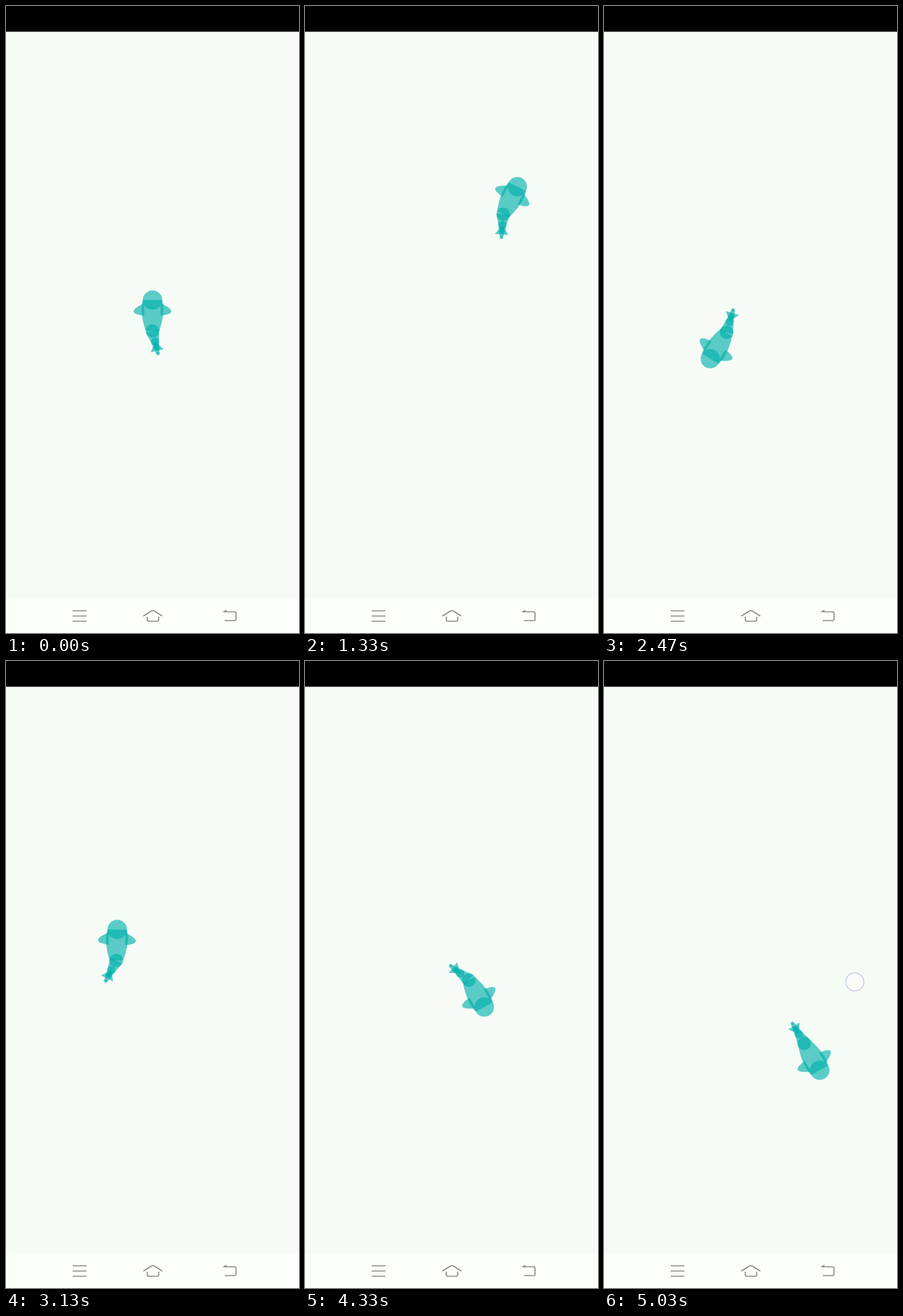
An HTML page with a canvas that plays this animation: 448x960 px, repeating every 5.06 s.

```html
<!DOCTYPE html>
<html lang="en">
<head>
<meta charset="utf-8">
<title>Swimming fish</title>
<style>
  html, body { margin: 0; width: 100%; height: 100%; overflow: hidden; background: #f6fbf6; }
  canvas { display: block; width: 448px; height: 960px; }
</style>
</head>
<body>
<canvas id="stage" width="448" height="960"></canvas>
<script>
const ctx = document.getElementById('stage').getContext('2d');
const LOOP = 5060, STEP = 100 / 3;

// Fish proportions, all derived from the head radius
const HEAD = 14.8;
const BODY = 3.2 * HEAD;
const BIG = 0.7 * HEAD;
const MID = 0.6 * BIG;
const TIP = 0.4 * MID;
const FIN = 1.3 * HEAD;
const TEAL = 'rgba(0,176,172,0.63)';

// Tap targets: the fish starts towards each one at `go` (seconds)
const START = { x: 224, y: 474 };
const TAPS = [
  { x: 321.5, y: 282.5, go: 0.615 },
  { x: 166.5, y: 533.5, go: 1.70 },
  { x: 171.8, y: 351.3, go: 2.81 },
  { x: 318, y: 606, go: 3.95 },
  { x: 383.5, y: 491.3, go: 5.08 }
];
const LEG = 1, TAP_LEAD = 0.18;

// Tail phase in degrees over time in seconds
const PHASE = [[0, 30], [0.5, 210], [0.73, 370], [1.33, 775], [2.47, 1588],
               [3.13, 2048], [4.33, 2932], [5.03, 3416], [5.07, 3444]];

const rad = d => d * Math.PI / 180;

function polar(p, len, deg) {
  return { x: p.x + len * Math.cos(rad(deg)), y: p.y - len * Math.sin(rad(deg)) };
}

function lerpTable(table, t) {
  let i = 1;
  while (i < table.length - 1 && t > table[i][0]) i++;
  const [t0, a] = table[i - 1], [t1, b] = table[i];
  return a + (b - a) * (t - t0) / (t1 - t0);
}

function fishPose(t) {
  let from = START, pose = { x: from.x, y: from.y, angle: 90 };
  for (const tap of TAPS) {
    if (t < tap.go) break;
    const rest = 1 - Math.min(1, (t - tap.go) / LEG);
    const k = 1 - rest * rest;
    const dx = tap.x - from.x, dy = tap.y - from.y;
    pose = {
      x: from.x + dx * k,
      y: from.y + dy * k,
      angle: Math.atan2(-dy, dx) * 180 / Math.PI
    };
    from = tap;
  }
  return pose;
}

function disc(p, r) {
  ctx.beginPath();
  ctx.arc(p.x, p.y, r, 0, 2 * Math.PI);
  ctx.fill();
}

function polygon(points) {
  ctx.beginPath();
  points.forEach(p => ctx.lineTo(p.x, p.y));
  ctx.closePath();
  ctx.fill();
}

function fin(head, angle, side) {
  const a = polar(head, 0.9 * HEAD, angle + side * 110);
  const b = polar(a, FIN, angle - 180);
  const c = polar(a, 1.88 * FIN, angle + side * 115);
  ctx.beginPath();
  ctx.moveTo(a.x, a.y);
  ctx.quadraticCurveTo(c.x, c.y, b.x, b.y);
  ctx.fill();
}

function segment(p, r0, r1, len, angle) {
  const end = polar(p, len, angle - 180);
  disc(end, r1);
  polygon([polar(p, r0, angle + 90), polar(end, r1, angle + 90),
           polar(end, r1, angle - 90), polar(p, r0, angle - 90)]);
  return end;
}

function tailFin(p, len, edge, angle) {
  const c = polar(p, len, angle - 180);
  polygon([p, polar(c, edge, angle + 90), polar(c, edge, angle - 90)]);
}

function body(head, rear, angle) {
  const hl = polar(head, HEAD, angle + 90), hr = polar(head, HEAD, angle - 90);
  const rl = polar(rear, BIG, angle + 90), rr = polar(rear, BIG, angle - 90);
  const cl = polar(head, 0.56 * BODY, angle + 130), cr = polar(head, 0.56 * BODY, angle - 130);
  ctx.beginPath();
  ctx.moveTo(hl.x, hl.y);
  ctx.quadraticCurveTo(cl.x, cl.y, rl.x, rl.y);
  ctx.lineTo(rr.x, rr.y);
  ctx.quadraticCurveTo(cr.x, cr.y, hr.x, hr.y);
  ctx.fill();
}

function fish(t) {
  const pose = fishPose(t), angle = pose.angle;
  const bend = angle + 27 * Math.sin(rad(lerpTable(PHASE, t)));
  const head = polar(pose, BODY / 2, angle);
  const rear = polar(pose, BODY / 2, angle - 180);
  ctx.fillStyle = TEAL;
  disc(head, HEAD);
  fin(head, angle, -1);
  fin(head, angle, 1);
  disc(rear, BIG);
  const joint = segment(rear, BIG, MID, BIG + MID, bend);
  segment(joint, MID, TIP, 3.1 * MID, bend);
  tailFin(joint, 14.5, BIG, bend);
  tailFin(joint, 11.5, 4.5, bend);
  body(head, rear, angle);
}

function tapRing(tap, t) {
  const age = t - tap.go;
  if (age < -TAP_LEAD || age > 0.16) return;
  ctx.globalAlpha = Math.min(1, (0.16 - age) / 0.16);
  ctx.beginPath();
  ctx.arc(tap.x, tap.y, 13.8, 0, 2 * Math.PI);
  ctx.fillStyle = 'rgba(255,255,255,0.3)';
  ctx.fill();
  ctx.strokeStyle = '#cfd3ec';
  ctx.lineWidth = 1.9;
  ctx.stroke();
  ctx.globalAlpha = 1;
}

const ICONS = new Path2D(
  'M102 926H123M102 934H123M102 942H123' +
  'M210 934L222.5 926.3Q224.5 925.2 226.5 926.3L239 934' +
  'M216 935V939.5Q216 942 218.5 942H231Q233.5 942 233.5 939.5V935' +
  'M333 927.5H349.5Q351.7 927.5 351.7 929.7V938.8Q351.7 941 349.5 941H334.5');
const ARROW = new Path2D('M330.5 928L337 924.5V928Z');

function screen() {
  ctx.fillStyle = '#f6fbf6';
  ctx.fillRect(0, 0, 448, 960);
  ctx.fillStyle = '#000';
  ctx.fillRect(0, 0, 448, 39.4);
  ctx.fillStyle = '#fbfffa';
  ctx.fillRect(0, 907.5, 448, 52.5);
  ctx.strokeStyle = ctx.fillStyle = '#858885';
  ctx.lineWidth = 1.6;
  ctx.stroke(ICONS);
  ctx.fill(ARROW);
}

const begin = performance.now();

function draw() {
  const ms = (performance.now() - begin) % LOOP;
  const t = Math.floor((ms + 4) / STEP) * STEP / 1000;
  screen();
  fish(t);
  TAPS.forEach(tap => tapRing(tap, t));
  requestAnimationFrame(draw);
}
draw();
</script>
</body>
</html>
```
